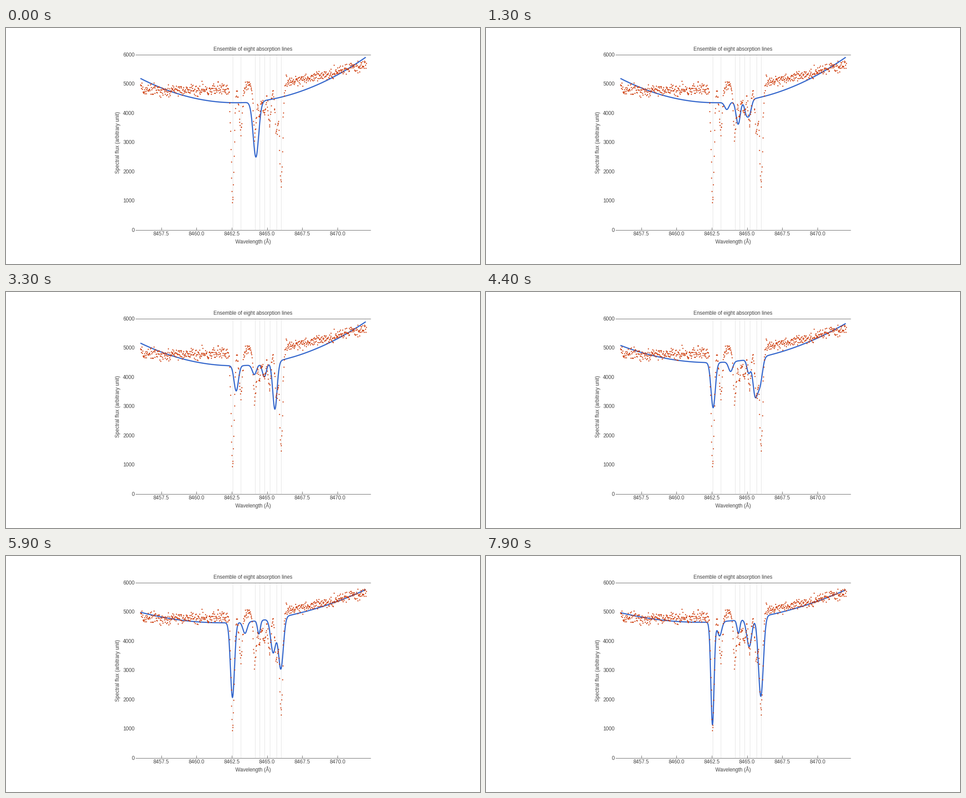
Animation of 1058 by 529 pixels, one loop 8 s. Source, as a matplotlib script:

```python
import numpy as np
import matplotlib.pyplot as plt
from matplotlib.animation import FuncAnimation

W, H, DPI = 1058, 529, 100
FRAMES, STEP = 80, 0.1          # step in seconds
PX = 72 / DPI
LEFT, RIGHT, TOP, BOTTOM = 300, 803, 59.5, 452.5
BLUE, RED, GREY = "#3366cc", "#cc3300", "#444444"

plt.rcParams["font.family"] = "Liberation Sans"
plt.rcParams["font.size"] = 11.55 * PX


def ease(t, t0, t1):
    """Smooth 0 to 1 between two times."""
    u = np.clip((t - t0) / (t1 - t0), 0, 1)
    return u * u * (3 - 2 * u)


def ease_out(t, length):
    """Quick start from time zero, slowing to a stop."""
    return np.sin(np.pi / 2 * min(t / length, 1))


def parabola(x, p, q, r):
    """Quadratic through three (x, y) points, in Newton form."""
    s1 = (q[1] - p[1]) / (q[0] - p[0])
    s2 = (r[1] - q[1]) / (r[0] - q[0])
    bend = (s2 - s1) / (r[0] - p[0])
    return p[1] + s1 * (x - p[0]) + bend * (x - p[0]) * (x - q[0])


def bump(x, centre, depth, sigma):
    return depth * np.exp(-0.5 * ((x - centre) / sigma) ** 2)


# Measured spectrum: centre and depth of the eight absorption lines
DIPS = [(505.5, 253), (523.5, 98), (555, 112), (565.5, 63),
        (576.5, 63), (588, 90), (603.3, 107), (613.8, 228)]

rng = np.random.default_rng(8)
dots_x = np.linspace(LEFT, RIGHT + 0.5, 640)
dots_y = parabola(dots_x, (LEFT, 137.5), (480, 136), (RIGHT, 82))
dots_y += sum(bump(dots_x, c, d, 3.4) for c, d in DIPS)
dots_y += np.clip(rng.normal(0, 6.2, dots_x.size), -19, 19)

curve_x = np.linspace(LEFT, RIGHT, 1000)


def lines_at(t):
    """Centre, depth and width of the fitted lines, all leaving one point."""
    start = 557.5
    nudge = start + 4.5 * ease_out(t, 1.3)
    yield (start - 52 * ease_out(t, 5.2),
           16 + 220 * ease(t, 1.3, 8.6),
           4.8 - 1.2 * ease(t, 5, 8))
    yield (nudge - 42 * ease(t, 1.3, 8.7),
           22 + 10 * ease(t, 4.4, 8),
           4.7)
    yield (nudge + 1.5 + 25 * np.exp(-(t - 4.1) ** 2),
           30,
           4.5 - 1.4 * ease(t, 3, 6))
    yield (start + 43 * ease_out(t, 3.6) - 14 * ease(t, 4.4, 8.6),
           26 + 52 * ease(t, 1.3, 3.8) - 15 * ease(t, 5.5, 7.5),
           4 + 1.5 * ease(t, 1.3, 6))
    yield (start + 32 * ease_out(t, 1.6) + 24 * ease(t, 1.8, 5),
           31 + 154 * ease(t, 2.8, 8.6),
           4.5 + ease(t, 1.3, 3.3))


def model(t):
    relax = 1 / (1 + np.exp((4.45 - t) / 0.55))
    y = parabola(curve_x, (LEFT, 113 + 14 * relax),
                 (515, 167.5 - 20 * relax), (RIGHT, 65.5 + 10.5 * relax))
    blur = 1.38 - 0.38 * ease(t, 0, 1.3)
    return y + sum(bump(curve_x, c, d, s * blur) for c, d, s in lines_at(t))


fig = plt.figure(figsize=(W / DPI, H / DPI), dpi=DPI, facecolor="white")
ax = fig.add_axes([0, 0, 1, 1])
ax.set_xlim(0, W)
ax.set_ylim(H, 0)
ax.axis("off")


def segment(x0, y0, x1, y1, color="#666666", **kw):
    ax.plot([x0, x1], [y0, y1], color=color, lw=PX, solid_capstyle="butt", **kw)


def label(x, y, text, ha="center", **kw):
    ax.text(x, y, text, ha=ha, va="baseline", color=GREY, **kw)


for centre, _ in DIPS:
    x = int(centre) + 0.5
    segment(x, TOP, x, BOTTOM, "#aaaaaa", ls=(0, (1, 2)), dash_capstyle="butt")
for y in (TOP, BOTTOM):
    segment(289, y, 814, y)
for i in range(6):
    x = 346.5 + 78.7 * i
    segment(x, BOTTOM - 6, x, BOTTOM)
    label(x, 465, f"{8457.5 + 2.5 * i:.1f}")
for i in range(7):
    label(287, BOTTOM - 65.5 * i + 4.2, str(1000 * i), ha="right")

label(551, 51.3, "Ensemble of eight absorption lines")
label(551.5, 483.3, "Wavelength (Å)")
label(253, 256.5, "Spectral flux (arbitrary unit)", rotation=90,
      rotation_mode="anchor")

curve, = ax.plot(curve_x, model(0), color=BLUE, lw=2.5 * PX, zorder=3,
                 solid_capstyle="butt", solid_joinstyle="round")
ax.plot(dots_x, dots_y, "o", color=RED, ms=2.5 * PX, mew=0, zorder=4)


def draw(i):
    curve.set_ydata(model(i * STEP))
    return curve,


anim = FuncAnimation(fig, draw, frames=FRAMES, interval=1000 * STEP,
                     repeat=True, repeat_delay=0, init_func=lambda: draw(0))
plt.show()
```
